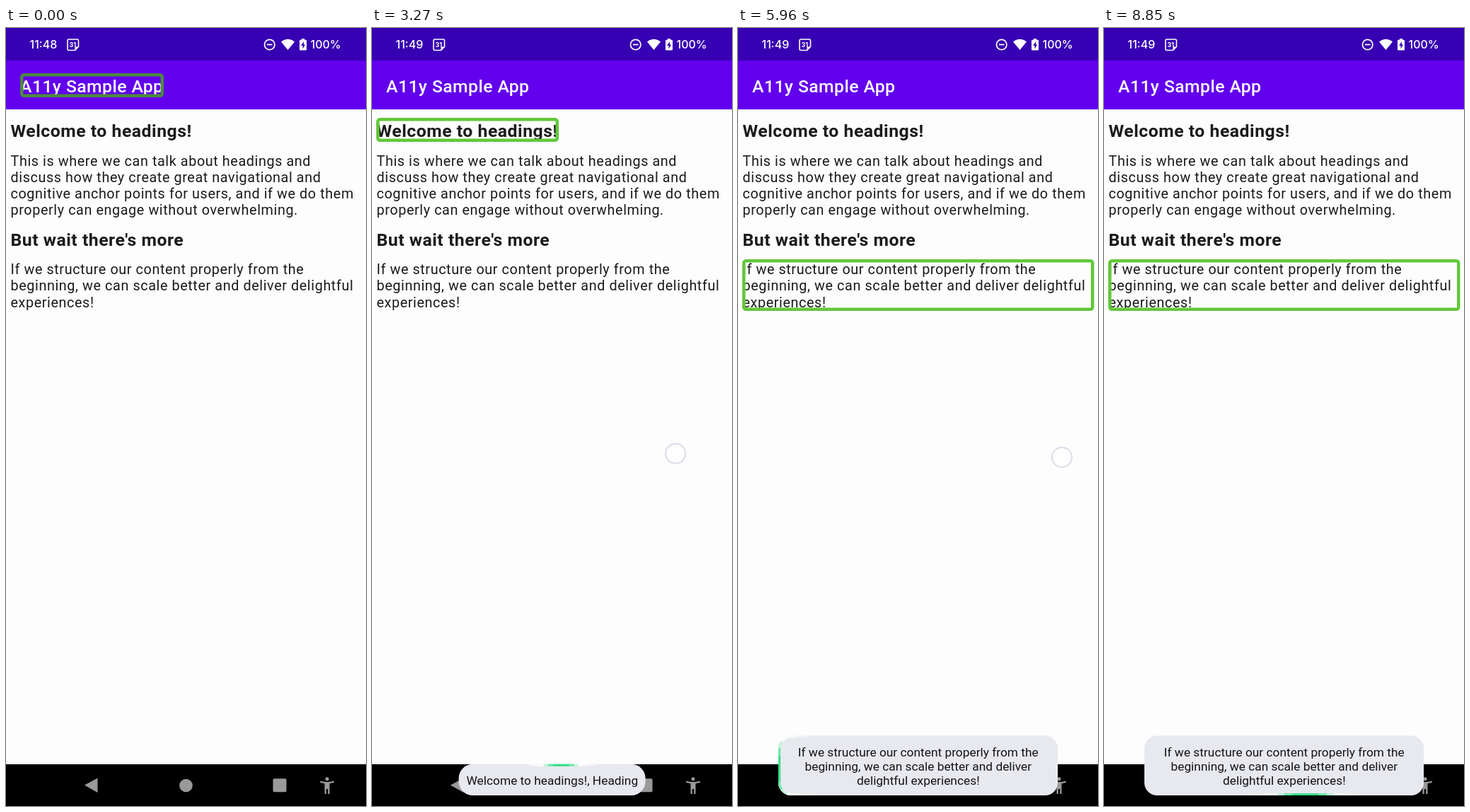
An HTML page for the animation above (8.89 s loop, 509 by 1100 pixels).

```html
<!DOCTYPE html>
<html lang="en">
<head>
<meta charset="utf-8">
<title>Headings demo</title>
<style>
  html, body { margin: 0; width: 100%; height: 100%; overflow: hidden; background: #fdfdfd; }
  svg { display: block; width: 100%; height: 100%; }
  text { font-family: Roboto, sans-serif; fill: #1b1b1d; white-space: pre; }
  .status { font: 500 16px Inter, sans-serif; fill: #fff; }
  .title { font-size: 24.8px; font-weight: 500; letter-spacing: .39px; fill: #fff; }
  .head { font-size: 24.8px; font-weight: 700; letter-spacing: .5px; }
  .body { font-size: 19.8px; letter-spacing: .595px; }
  #words { font-size: 17.33px; text-anchor: middle; fill: #141416; }
  #glow rect { fill: none; stroke-width: 3; }
</style>
</head>
<body>
<svg viewBox="0 0 509 1100">
  <defs>
    <linearGradient id="shade" x2="0" y2="1">
      <stop stop-color="#000" stop-opacity=".08"/>
      <stop offset="1" stop-color="#000" stop-opacity="0"/>
    </linearGradient>
  </defs>
  <rect width="509" height="1100" fill="#fdfdfd"/>
  <rect y="115" width="509" height="4" fill="url(#shade)"/>
  <rect y="46" width="509" height="69" fill="#6200ee"/>
  <rect width="509" height="46" fill="#3700b3"/>

  <!-- status bar -->
  <text id="clock" class="status" x="33.5" y="29.4">11:48</text>
  <path d="M89 16H100.500Q102.500 16 102.500 18V26.500L97.500 31.500H89Q87 31.500 87 29.500V18Q87 16 89 16Z" fill="none" stroke="#fff" stroke-width="1.6"/>
  <path d="M97.500 31.500V26.500H102.500Z" fill="#fff"/>
  <text class="status" x="89.500" y="27" style="font-size:9px;font-weight:700">31</text>
  <circle cx="372.700" cy="23.500" r="7.200" fill="none" stroke="#fff" stroke-width="1.700"/>
  <path d="M369 23.500H376.500" stroke="#fff" stroke-width="1.800"/>
  <path d="M389 19.500Q398.500 12 408 19.500L398.500 31Z" fill="#fff"/>
  <path d="M418 15H422V16.800H424Q425 16.800 425 17.800V30.500Q425 31.500 424 31.500H416Q415 31.500 415 30.500V17.800Q415 16.800 416 16.800H418Z" fill="#fff"/>
  <path d="M421 19L417.200 25H419.500V29.500L423 23.500H421Z" fill="#3700b3"/>
  <text class="status" x="430.5" y="29.4">100%</text>

  <text class="title" x="20" y="90.500">A11y Sample App</text>
  <g id="page"></g>

  <!-- navigation bar -->
  <rect y="1041" width="509" height="59" fill="#000"/>
  <g fill="#999">
    <path d="M111 1070.500L129.500 1060.500V1081Z"/>
    <circle cx="254.500" cy="1071" r="9.300"/>
    <rect x="377.500" y="1061.300" width="19" height="19" rx="2"/>
    <circle cx="454" cy="1061.800" r="2.500"/>
    <path d="M444.500 1064.500Q454 1067.500 463.500 1064.500L464 1066.800Q461 1067.700 457.500 1068.200V1083H455.200V1076H452.800V1083H450.500V1068.200Q447 1067.700 444 1066.800Z"/>
  </g>

  <rect id="focus" fill="none" stroke-width="4.5" rx="3"/>
  <circle id="touch" r="14" fill="#fff" fill-opacity=".6" stroke="#dcdbe9" stroke-width="2"/>
  <g id="toast">
    <rect id="panel" fill="#e8e9ee"/>
    <g id="glow"></g>
    <text id="words"></text>
  </g>
</svg>
<script>
const LOOP = 8890;
const $ = id => document.getElementById(id);

function make(parent, tag, attrs, text = '') {
  const el = document.createElementNS('http://www.w3.org/2000/svg', tag);
  set(el, attrs);
  el.textContent = text;
  return parent.appendChild(el);
}
function set(el, attrs) {
  for (const k in attrs) el.setAttribute(k, attrs[k]);
}

function block(cls, y, ...lines) {
  lines.forEach((s, i) => make($('page'), 'text', { class: cls, x: 6.5, y: y + i * 23.1 }, s));
}
block('head', 154, 'Welcome to headings!');
block('body', 194.5, 'This is where we can talk about headings and',
  'discuss how they create great navigational and',
  'cognitive anchor points for users, and if we do them',
  'properly can engage without overwhelming.');
block('head', 308, "But wait there's more");
block('body', 348.3, 'If we structure our content properly from the',
  'beginning, we can scale better and deliver delightful', 'experiences!');

// box: left, top, right, bottom; glow: [time, turns around the panel]
const steps = [
  { at: 0, box: [20, 64, 223, 98], color: '#4b8a3d' },
  { at: 2400, box: [6, 127, 264, 161], width: 264, glow: [[2400, 0], [3400, .25]],
    lines: ['Welcome to headings!, Heading'] },
  { at: 3400, box: [6, 173, 503.5, 269], width: 395, glow: [[3400, .19], [4900, .55]],
    lines: ['This is where we can talk about headings and',
      'discuss how they create great navigational', 'and cognitive anchor points for users, and',
      'if we do them properly can engage without', 'overwhelming.'] },
  { at: 4900, box: [6, 281, 252, 315], width: 255, glow: [[4900, .34], [5750, .55]],
    lines: ["But wait there's more, Heading"] },
  { at: 5750, box: [6, 327, 503.5, 400], width: 395,
    glow: [[5750, .88], [5960, .94], [7730, 1.45], [8890, 1.67]],
    lines: ['If we structure our content properly from the',
      'beginning, we can scale better and deliver', 'delightful experiences!'] }
];

// start, lift, end x, end y
const swipes = [
  [2120, 2350, 430, 596], [3140, 3380, 444, 600],
  [4640, 4880, 450, 603], [5570, 6000, 458, 607]
];

// nested dashes build a soft white edge with a green core
const dashes = [
  [.17, '#fff', .35], [.14, '#fff', .5], [.11, '#fff', .7],
  [.085, '#8fefc0', .6], [.065, '#4be396', .7], [.04, '#2edc83', .8]
].map(([len, stroke, opacity]) => ({
  len,
  el: make($('glow'), 'rect', { stroke, opacity, pathLength: 1, 'stroke-dasharray': `${len} ${1 - len}` })
}));

const clamp = v => Math.max(0, Math.min(1, v));
function along(keys, t) {
  let i = 1;
  while (i < keys.length - 1 && t > keys[i][0]) i++;
  const [a, p] = keys[i - 1], [b, q] = keys[i];
  return p + (q - p) * clamp((t - a) / (b - a));
}

let shown;
function show(step) {
  shown = step;
  const [l, t, r, b] = step.box;
  set($('focus'), { x: l + 2.25, y: t + 2.25, width: r - l - 4.5, height: b - t - 4.5,
    stroke: step.color || '#62c83a' });
  $('words').textContent = '';
  if (!step.lines) return;
  const n = step.lines.length, h = 24 + n * 20.2, x = 254.6 - step.width / 2, y = 1085 - h;
  const rx = n > 1 ? 18 : 20;
  set($('panel'), { x, y, width: step.width, height: h, rx });
  for (const d of dashes)
    set(d.el, { x: x + 1.5, y: y + 1.5, width: step.width - 3, height: h - 3, rx: rx - 1.5 });
  step.lines.forEach((s, i) =>
    make($('words'), 'tspan', { x: 254.8, y: 1070 - (n - 1 - i) * 20.25 }, s));
}

function draw(now) {
  const t = now % LOOP;
  const step = steps.findLast(s => t >= s.at);
  if (step !== shown) show(step);
  $('clock').textContent = t < 2750 ? '11:48' : '11:49';

  $('toast').setAttribute('opacity', step.lines ? clamp((t - steps[1].at) / 150) : 0);
  if (step.lines) {
    const pos = along(step.glow, t);
    for (const d of dashes) d.el.setAttribute('stroke-dashoffset', d.len / 2 - pos % 1);
  }

  const swipe = swipes.find(([a, b]) => t >= a && t < b);
  $('touch').setAttribute('visibility', swipe ? 'visible' : 'hidden');
  if (swipe) {
    const [a, , x, y] = swipe, left = 1 - clamp((t - a) / 180);
    set($('touch'), { cx: x - 200 * left * left, cy: y + 6 * left });
  }
}

const start = performance.now();
function tick() {
  draw(performance.now() - start);
  requestAnimationFrame(tick);
}
tick();
</script>
</body>
</html>
```
